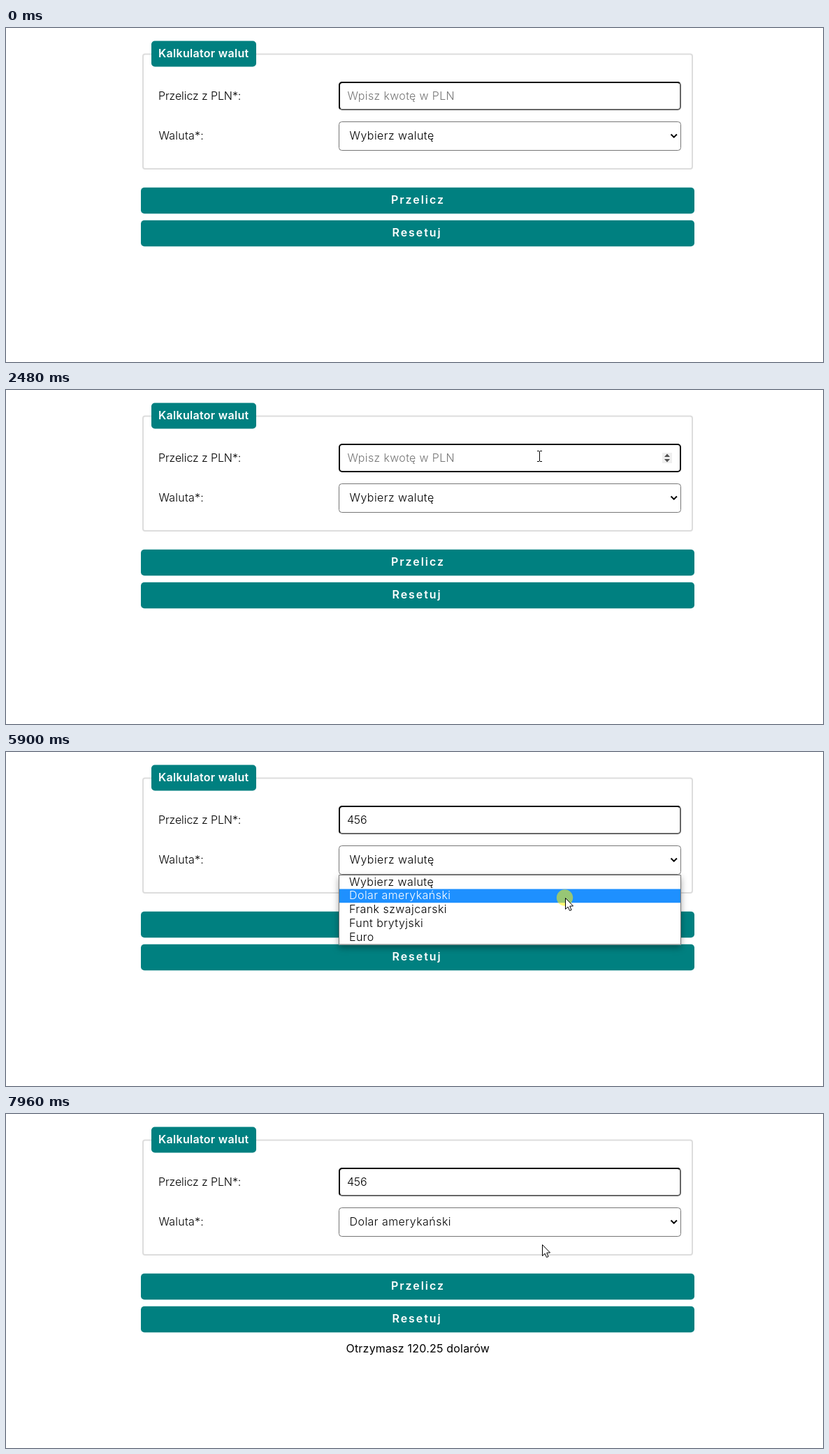
Write an HTML page with a canvas that moves like this. It is 1169 px wide and 479 px high and loops after 8 s.

```html
<!DOCTYPE html>
<html lang="pl">
<head>
<meta charset="utf-8">
<title>Kalkulator walut</title>
<style>
html, body { margin: 0; width: 100%; height: 100%; overflow: hidden; background: #fff; }
canvas { display: block; }
</style>
</head>
<body>
<canvas id="stage" width="1169" height="479"></canvas>
<script>
const ctx = document.getElementById('stage').getContext('2d');
const LOOP = 8000, STEP = 80, BLINK = 500;
const TEAL = '#008080', TEAL_HOVER = '#009999', GREY = '#767676', INK = '#0a0a0a';
const OPTIONS = ['Wybierz walutę', 'Dolar amerykański', 'Frank szwajcarski', 'Funt brytyjski', 'Euro'];
const ROW = 19.8, LIST_TOP = 176.7;
const LEFT = 476, WIDTH = 490;

const CLICK = {
  amount: { from: 1970, to: 2150 },
  select: { from: 4710, to: 4880 },
  option: { from: 5900, to: 5990 },
  submit: { from: 6850, to: 7000 }
};
const KEY_TIMES = [2930, 3170, 3390];

// Each glide eases the pointer from where it rests to x, y.
const GLIDES = [
  { from: 600, to: 600, x: 1065, y: 422 },
  { from: 690, to: 770, x: 849, y: 267 },
  { from: 1050, to: 1050, x: 844, y: 248 },
  { from: 1130, to: 1680, x: 763, y: 95 },
  { from: 3790, to: 4400, x: 830, y: 160 },
  { from: 5100, to: 5350, x: 797, y: 190 },
  { from: 5500, to: 5750, x: 800, y: 209 },
  { from: 6220, to: 6610, x: 768, y: 248 },
  { from: 7790, to: 7960, x: 767, y: 187 }
];

const within = (t, { from, to }) => t >= from && t < to;
const easeOut = u => 1 - (1 - u) ** 2;
const lerp = (a, b, u) => Math.round(a + (b - a) * u);

function pointerAt(t) {
  const started = GLIDES.filter(g => t >= g.from);
  if (!started.length) return null;
  const goal = started.pop();
  const rest = started.pop() || goal;
  const gaps = Math.round((goal.to - goal.from) / STEP);
  const gap = (goal.to - goal.from) / gaps || STEP;
  const step = Math.min(gaps, Math.floor((t - goal.from) / gap + 0.02));
  const u = easeOut((step + 1) / (gaps + 1));
  return { x: lerp(rest.x, goal.x, u), y: lerp(rest.y, goal.y, u) };
}

function caretVisible(t) {
  const last = [CLICK.amount.from, ...KEY_TIMES].filter(time => time <= t).pop();
  return t < CLICK.select.from && (t - last) % (2 * BLINK) < BLINK;
}

function fillBox(x, y, w, h, r, color) {
  ctx.beginPath();
  ctx.roundRect(x, y, w, h, r);
  ctx.fillStyle = color;
  ctx.fill();
}

function strokeBox(x, y, w, h, r, color, line) {
  ctx.beginPath();
  ctx.roundRect(x + line / 2, y + line / 2, w - line, h - line, r);
  ctx.strokeStyle = color;
  ctx.lineWidth = line;
  ctx.stroke();
}

function polygon(...points) {
  ctx.beginPath();
  points.forEach(([x, y]) => ctx.lineTo(x, y));
  ctx.closePath();
}

function text(str, x, y, { color = '#000', weight = 300, spacing = 0.2 } = {}) {
  ctx.font = `${weight} 16px Inter, "Open Sans", sans-serif`;
  ctx.letterSpacing = spacing + 'px';
  ctx.fillStyle = color;
  ctx.fillText(str, x, y);
}

function drawButton(label, x, y, hover) {
  fillBox(193, y - 0.2, 792, 37.4, 5, hover ? TEAL_HOVER : TEAL);
  text(label, x, y + 23, { color: '#fff', weight: 600, spacing: 1.95 });
}

function drawSpinner() {
  fillBox(939, 90, 14, 15, 0, '#efefef');
  ctx.fillStyle = '#505050';
  for (const side of [-1, 1]) {
    const base = 97.5 + side * 1.5;
    polygon([942, base], [946, base + side * 4.5], [950, base]);
    ctx.fill();
  }
}

function drawAmount(t, pointer) {
  const focused = within(t, { from: CLICK.amount.from, to: CLICK.select.from });
  const frame = color => strokeBox(LEFT, 77, WIDTH, 41, 4, color, 2);
  frame(focused ? INK : '#666');
  if (!focused) {
    ctx.save();
    polygon([476, 118], [476, 77], [966, 77], [946, 97], [496, 98]);
    ctx.clip();
    frame(INK);
    ctx.restore();
  }
  const typed = '456'.slice(0, KEY_TIMES.filter(time => t >= time).length);
  if (typed) text(typed, 488, 103, { spacing: -0.2 });
  else text('Wpisz kwotę w PLN', 488.5, 103, { color: GREY, spacing: 0.35 });
  if (focused || pointer && inAmount(pointer)) drawSpinner();
  if (focused && caretVisible(t)) {
    fillBox(488 + Math.round(typed.length * 9.7), 89, 1, 18, 0, '#000');
  }
}

function drawSelect(t) {
  const focused = within(t, { from: CLICK.option.to, to: CLICK.submit.from });
  strokeBox(LEFT, 134, WIDTH, 42, 4, focused ? INK : GREY, focused ? 2 : 1);
  text(OPTIONS[t < CLICK.option.to ? 0 : 1], 491.5, 160, { spacing: 0.45 });
  ctx.beginPath();
  ctx.moveTo(951.5, 152.5);
  ctx.lineTo(955.7, 156.7);
  ctx.lineTo(959.9, 152.5);
  ctx.strokeStyle = '#000';
  ctx.lineWidth = 2;
  ctx.stroke();
}

function drawList(pointer) {
  ctx.save();
  ctx.shadowColor = 'rgba(0,0,0,.35)';
  ctx.shadowBlur = 9;
  ctx.shadowOffsetY = 4;
  fillBox(LEFT, 176, WIDTH, 100.5, 0, '#fff');
  ctx.restore();
  const active = Math.max(0, Math.floor((pointer.y - LIST_TOP) / ROW));
  fillBox(LEFT + 1, LIST_TOP + active * ROW, WIDTH - 2, ROW, 0, '#1e90ff');
  OPTIONS.forEach((label, i) => text(label, 491, 191.5 + i * ROW,
    { color: i === active ? '#fff' : '#000', spacing: 0.45 }));
  strokeBox(LEFT, 176, WIDTH, 100.5, 0, GREY, 1);
}

function inAmount({ x, y }) {
  return x > LEFT && x < LEFT + WIDTH && y > 77 && y < 118;
}

function drawBeam(x, y) {
  ctx.fillStyle = '#000';
  ctx.fillRect(x, y - 7, 1, 14);
  for (const edge of [y - 8, y + 7]) {
    ctx.fillRect(x - 3, edge, 3, 1);
    ctx.fillRect(x + 1, edge, 3, 1);
  }
}

function drawArrow(x, y) {
  ctx.save();
  ctx.translate(x + 0.5, y + 0.5);
  polygon([0, 0], [0, 16], [3.6, 12.6], [6, 18], [8.6, 17], [6.2, 11.6], [11, 11.4]);
  ctx.fillStyle = '#fff';
  ctx.fill();
  ctx.strokeStyle = '#000';
  ctx.lineWidth = 1;
  ctx.stroke();
  ctx.restore();
}

function drawPointer(t, pointer) {
  const { x, y } = pointer;
  if (Object.values(CLICK).some(span => within(t, span))) {
    ctx.beginPath();
    ctx.arc(x - 0.5, y, 11.7, 0, Math.PI * 2);
    ctx.fillStyle = 'rgba(255,244,0,.54)';
    ctx.fill();
  }
  (inAmount(pointer) ? drawBeam : drawArrow)(x, y);
}

function draw(t) {
  const pointer = pointerAt(t);
  const open = within(t, { from: CLICK.select.from, to: CLICK.option.to });
  const over = y => pointer && !open && pointer.x >= 193 && pointer.x < 985 &&
    pointer.y >= y && pointer.y < y + 37;

  ctx.fillStyle = '#fff';
  ctx.fillRect(0, 0, 1169, 479);
  strokeBox(195, 36.5, 788, 166.5, 3, '#ddd', 2);
  fillBox(208, 18.5, 150, 37, 5, TEAL);
  text('Kalkulator walut', 218, 42, { color: '#fff', weight: 600, spacing: 0.3 });
  text('Przelicz z PLN*:', 218, 103, { spacing: -0.1 });
  text('Waluta*:', 218.5, 160);

  drawAmount(t, pointer);
  drawSelect(t);
  drawButton('Przelicz', 551, 229, over(229));
  drawButton('Resetuj', 552.5, 276, over(276));
  if (t >= CLICK.submit.to) text('Otrzymasz 120.25 dolarów', 486.5, 342, { weight: 400 });
  if (open) drawList(pointer);
  if (pointer) drawPointer(t, pointer);
}

const start = performance.now();
function tick() {
  draw((performance.now() - start) % LOOP);
  requestAnimationFrame(tick);
}
tick();
</script>
</body>
</html>
```
